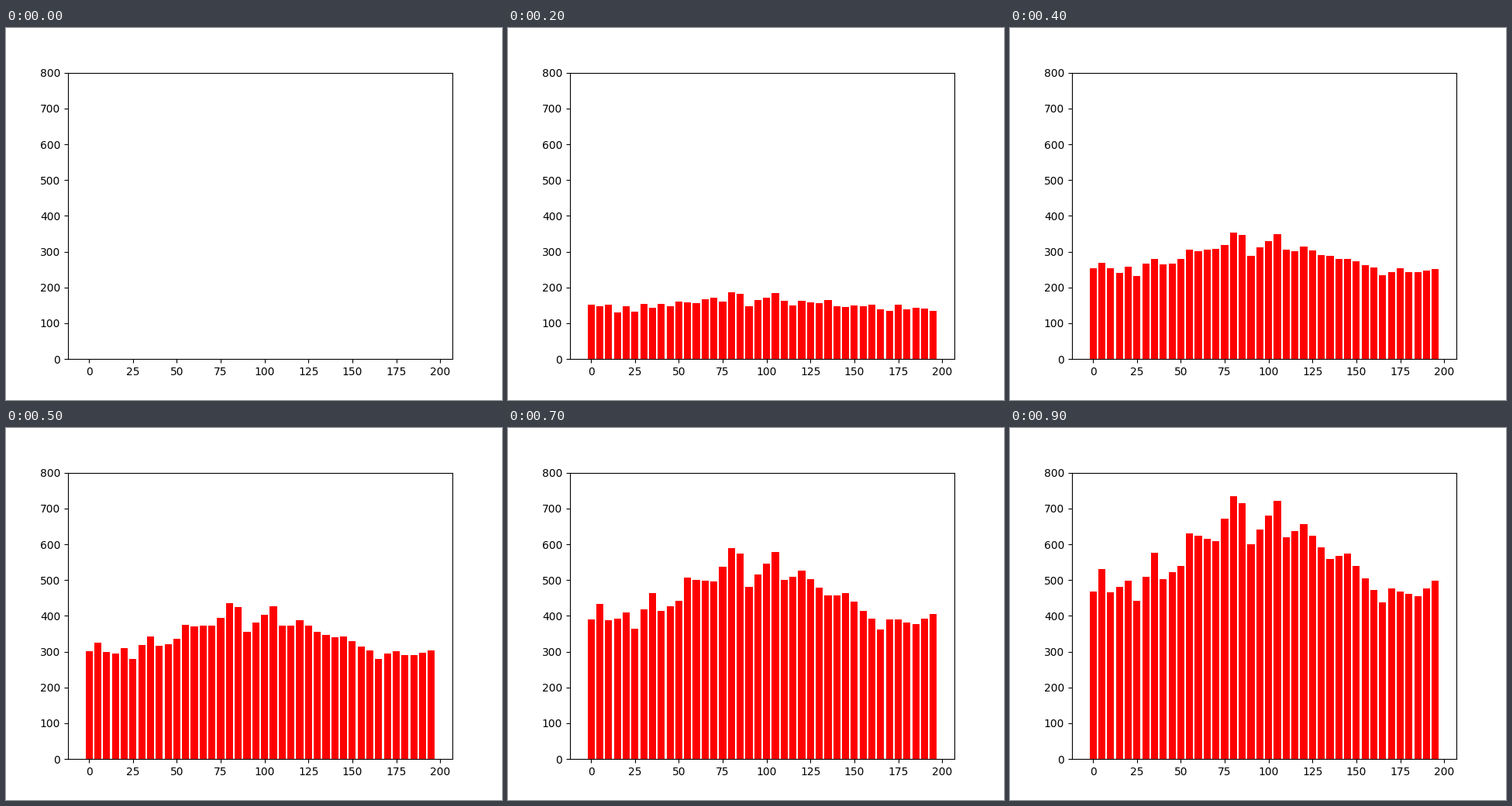
A matplotlib script that plays this animation: 640x480 px, repeating every 1000 ms.

```python
import numpy as np
import matplotlib.pyplot as plt
from matplotlib.animation import FuncAnimation

STEPS = 10
INTERVAL = 100
FIRST = 84    # mean height after the first step
EASE = 72     # early growth is slightly faster than late growth
JITTER = 16   # spread of the first heights, fading as the bars grow

positions = np.arange(0, 200, 5)
peaks_x = [0, 5, 10, 20, 25, 35, 40, 50, 55, 70, 80, 85,
           90, 105, 110, 120, 135, 145, 165, 170, 185, 195]
peaks_y = [468, 531, 465, 498, 442, 576, 503, 540, 630, 609, 734, 714,
           600, 721, 619, 656, 559, 574, 437, 476, 454, 498]
final = np.interp(positions, peaks_x, peaks_y)
jitter = np.random.default_rng(4).uniform(-JITTER, JITTER, len(positions))


def heights(step):
    if step == 0:
        return np.zeros(len(positions))
    u = (step - 1) / (STEPS - 2)
    growth = FIRST + (final - FIRST) * u + EASE * u * (1 - u)
    return growth + jitter * (1 - u)


fig, ax = plt.subplots(figsize=(6.4, 4.8), dpi=100)
bars = ax.bar(positions, heights(0), width=4, color="red")
ax.set_xlim(-11.95, 206.95)
ax.set_ylim(0, 800)


def update(step):
    for bar, height in zip(bars, heights(step)):
        bar.set_height(height)
    return bars.patches


anim = FuncAnimation(fig, update, frames=STEPS, interval=INTERVAL,
                     repeat=True, repeat_delay=0, blit=False)
plt.show()
```
